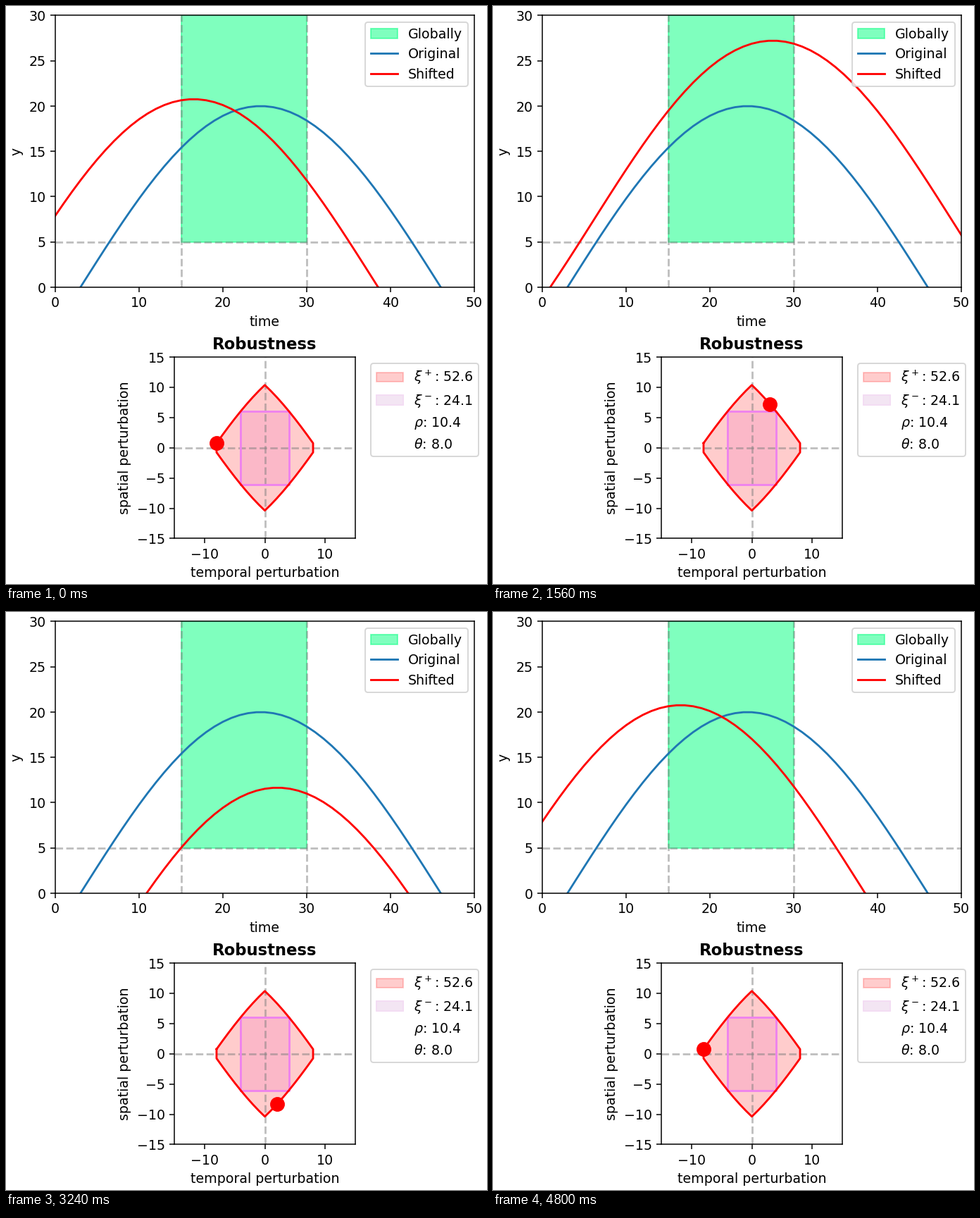
Recreate the animation shown at these times as a matplotlib script. Size 683 px wide and 820 px high, loop 5040 ms.

```python
import numpy as np
import matplotlib.pyplot as plt
from matplotlib.animation import FuncAnimation
from matplotlib.patches import Patch, Rectangle

W, H, DPI = 683, 820, 136.6
LOW, START, END = 5, 15, 30
THETA = 8
STEP_MS = 120


def signal(t):
    return 20 * np.sin(np.pi * (t - 3) / 43)


def margin(shift):
    """Spatial slack left after a shift in time."""
    return signal(START - np.abs(shift)) - LOW


def boundary():
    """Closed walk around the robust region, clockwise from the left."""
    left = np.arange(-THETA, 1)
    right = np.arange(0, THETA + 1)
    ends = np.array([THETA, THETA])
    upper = np.concatenate([left, right, ends[:1]])
    lower = np.concatenate([ends[:1], right[::-1], left[::-1], -ends[:1]])
    x = np.concatenate([[-THETA], upper, lower, -ends])
    y = np.concatenate([[margin(THETA)], margin(upper), -margin(lower), margin(ends)])
    return x, y


def add_axes(x0, y0, x1, y1):
    return fig.add_axes([x0 / W, 1 - y1 / H, (x1 - x0) / W, (y1 - y0) / H])


def guides(ax, xs, ys):
    style = dict(color="gray", alpha=0.5, ls="--", lw=1.5)
    for x in xs:
        ax.axvline(x, **style)
    for y in ys:
        ax.axhline(y, **style)


fig = plt.figure(figsize=(5, 6.003), dpi=DPI, facecolor="white")

# Signal plot
top = add_axes(70, 13.5, 665, 399)
top.add_patch(Rectangle((START, LOW), END - START, 30 - LOW,
                        color="springgreen", alpha=0.5, label="Globally"))
guides(top, [START, END], [LOW])
t = np.arange(-20, 71)
top.plot(t, signal(t), color="tab:blue", label="Original")
shifted, = top.plot([], [], color="red", label="Shifted")
top.set(xlim=(0, 50), ylim=(0, 30), xlabel="time", ylabel="y")
top.legend(loc="upper right")

# Robustness plot
path_x, path_y = boundary()
half = THETA / 2
rho = margin(half)
box_x = half * np.array([-1, 1, 1, -1, -1])
box_y = rho * np.array([-1, -1, 1, 1, -1])

low = add_axes(239, 498, 496, 755.5)
low.fill(box_x, box_y, fc="violet", ec="none", alpha=0.2)
low.fill(path_x, path_y, fc="red", ec="none", alpha=0.2)
guides(low, [0], [0])
low.plot(box_x, box_y, color="violet")
low.plot(path_x, path_y, color="red")
dot, = low.plot([], [], "o", color="red", ms=10)
low.set(xlim=(-15, 15), ylim=(-15, 15), xticks=[-10, 0, 10],
        yticks=range(-15, 16, 5), xlabel="temporal perturbation",
        ylabel="spatial perturbation")
low.set_title("Robustness", fontweight="bold")

blank = Patch(alpha=0)
low.legend(
    [Patch(color="red", alpha=0.2), Patch(fc="#f3e5f3", ec="#f3dcf3"), blank, blank],
    [r"$\xi^+$: 52.6", r"$\xi^-$: 24.1", r"$\rho$: 10.4", r"$\theta$: 8.0"],
    loc="upper left", bbox_to_anchor=(1.05, 1))


def update(i):
    dx, dy = path_x[i], path_y[i]
    dot.set_data([dx], [dy])
    shifted.set_data(t + dx, signal(t) + dy)
    return dot, shifted


anim = FuncAnimation(fig, update, frames=len(path_x), interval=STEP_MS,
                     repeat=True, repeat_delay=0)
plt.show()
```
